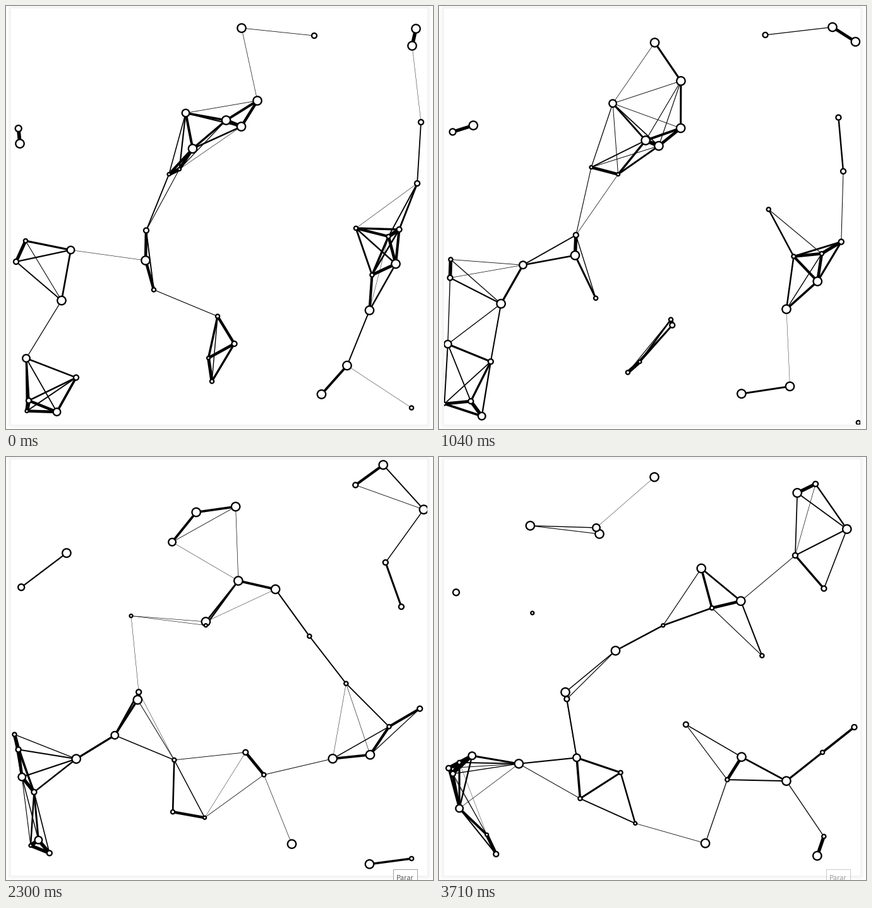
Write a matplotlib script that moves like this. It is 676 px wide and 670 px high and loops after 3780 ms.

```python
import numpy as np
import matplotlib.pyplot as plt
from matplotlib.animation import FuncAnimation
from matplotlib.collections import EllipseCollection, LineCollection
from matplotlib.patches import Rectangle

W, H, DPI = 676, 670, 100
FRAMES, INTERVAL = 54, 70
PX = 72 / DPI  # points per pixel
LOW, HIGH = np.array([8, 4]), np.array([667, 663])
REACH = 122.5  # longest link between two particles

# Particles by radius: x, y, then velocity per frame.
LARGE = [
    (373, 35, -2.245, 1.64), (398, 150, -1.075, -2.23),
    (348.5, 181, 2.44, 0.89), (372.5, 191, -1.755, 2.185),
    (295.5, 226, 2.26, -0.935), (221, 403, -0.395, -0.575),
    (88, 466.5, 0.725, 0.365), (22, 218, 2.31, -2.06),
    (649, 36, 0.74, 1.475), (643, 63, -1.43, -2.11),
    (617, 408.5, -1.265, 1.975), (575.5, 482, -1.82, -0.13),
    (540, 569.5, 1.11, 2.355), (499.5, 615, -1.47, -0.06),
]
MEDIUM = [
    (284.5, 169.5, -0.67, -1.085), (102.5, 386.5, 2.18, 1.695),
    (32, 558, -1.29, -1.6), (80.5, 643, -0.91, 2.385),
]
SMALL = [
    (111, 588.5, -2.08, -1.805), (16, 405, 0.113, 1.825),
    (36, 625, 1.025, 0.075), (488, 47, 2.04, -0.08),
    (361.5, 535, 0.555, -2.1), (657, 184, -1.755, -0.53),
    (651, 281, -0.785, -1.37), (622.5, 354, 1.02, 1.395),
    (222, 355.5, -0.37, 0.525),
]
TINY = [
    (234, 449.5, 1.01, 0.95), (31, 372, -0.89, 2.11),
    (335, 491.5, 2.29, 0.37), (326, 594.5, -1.935, -1.01),
    (554, 352, -2.3, -2.13), (605.5, 365, 0.03, 1.94),
    (579.5, 426, -1.285, -2.1), (642, 636.5, 1.56, 1.67),
]
DOT = [
    (274.5, 258.5, -2.39, -0.215), (258, 266.5, 1.825, 0.005),
    (320.5, 557.5, -0.185, 0.43), (33, 641.5, -1.75, -0.815),
]
GROUPS = [(6.7, LARGE), (5.8, MEDIUM), (5, [(19.7, 194, 0.14, 0.385)]),
          (4.0, SMALL), (3.1, TINY), (2.5, DOT)]

particles = np.array([p for _, group in GROUPS for p in group])
radii = np.array([r for r, group in GROUPS for _ in group])
start, velocity = particles[:, :2], particles[:, 2:]
first, second = np.triu_indices(len(particles), 1)


def positions(frame):
    """Straight paths folded back at the walls."""
    span = HIGH - LOW
    free = start + velocity * frame - LOW
    return LOW + span - np.abs(free % (2 * span) - span)


def shadow():
    """Soft grey halo around the white card."""
    y, x = np.mgrid[0:H, 0:W] + 0.5
    dx = np.maximum(np.maximum(LOW[0] - x, x - HIGH[0]), 0)
    dy = np.maximum(np.maximum(LOW[1] - y, y - HIGH[1]), 0)
    dist = np.hypot(dx, dy)
    return np.where(dist > 0, 1 - 0.05 * np.exp(-(dist / 5) ** 2), 1)


def tip_alpha(frame):
    fade_in = np.clip((frame - 15) / 3, 0, 1)
    return fade_in * (0.55 if frame == FRAMES - 1 else 1)


fig = plt.figure(figsize=(W / DPI, H / DPI), dpi=DPI, facecolor="white")
ax = fig.add_axes([0, 0, 1, 1])
ax.imshow(shadow(), cmap="gray", vmin=0, vmax=1, extent=(0, W, H, 0),
          interpolation="nearest", aspect="auto")
ax.set_xlim(0, W)
ax.set_ylim(H, 0)
ax.axis("off")

card = Rectangle(LOW, *(HIGH - LOW), transform=ax.transData)
links = LineCollection([], colors="black", capstyle="butt", zorder=2)
rings = EllipseCollection(2 * radii, 2 * radii, np.zeros(len(radii)),
                          units="xy", offsets=start,
                          offset_transform=ax.transData, facecolors="white",
                          edgecolors="black", linewidths=2.3 * PX, zorder=3)
for art in (links, rings):
    ax.add_collection(art, autolim=False)
    art.set_clip_path(card)

tip_box = ax.add_patch(Rectangle((612.5, 652.5), 38, 24, facecolor="white",
                                 edgecolor="#a0a0a0", linewidth=PX, zorder=4))
tip_text = ax.text(618, 670.5, "Parar", family="Noto Sans CJK JP",
                   fontsize=11 * PX, color="#575757", va="baseline", zorder=5)


def draw(frame):
    pos = positions(frame)
    dist = np.hypot(*(pos[first] - pos[second]).T)
    near = dist < REACH
    links.set_segments(np.stack([pos[first[near]], pos[second[near]]], axis=1))
    links.set_linewidths((0.4 + 0.055 * (REACH - dist[near])) * PX)
    rings.set_offsets(pos)
    for art in (tip_box, tip_text):
        art.set_alpha(tip_alpha(frame))
    return links, rings, tip_box, tip_text


anim = FuncAnimation(fig, draw, frames=FRAMES, interval=INTERVAL,
                     repeat=True, blit=False)
plt.show()
```
